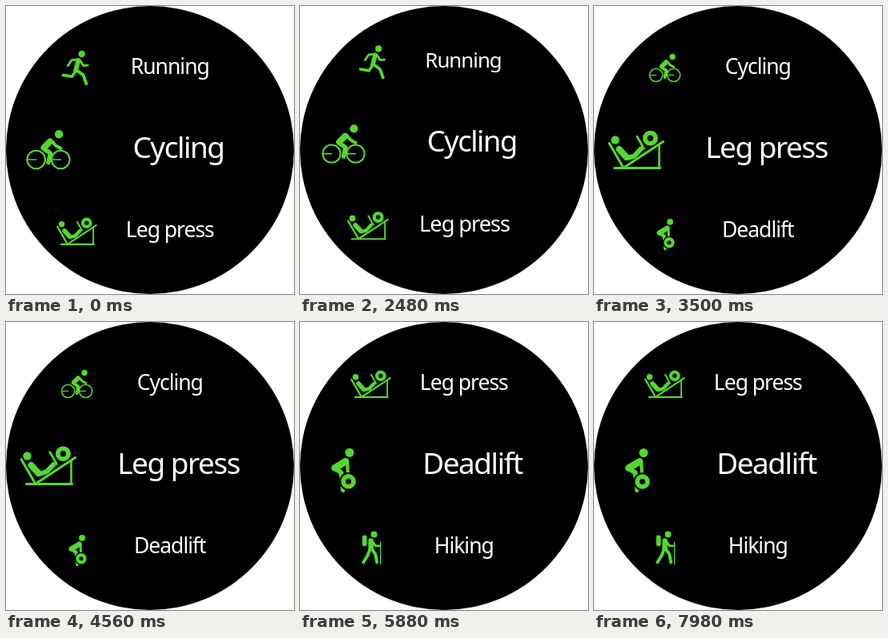
An HTML page with a canvas for the animation above (8 s loop, 360 by 360 pixels).

```html
<!DOCTYPE html>
<html lang="en">
<head>
<meta charset="utf-8">
<title>Workout list</title>
<style>
html, body { margin: 0; width: 100%; height: 100%; overflow: hidden; background: #fff; }
canvas { display: block; width: 360px; height: 360px; }
</style>
</head>
<body>
<canvas id="stage" width="360" height="360"></canvas>
<script>
const ctx = document.getElementById('stage').getContext('2d');
const GREEN = '#54d730';
const LOOP = 8000;
const PITCH = 102;
const MID_Y = 179;
const SCROLL_TIME = 400;
const SCROLLS = [2413, 5313];
const TAU = Math.PI * 2;

const clamp = v => Math.min(1, Math.max(0, v));
const ease = v => (1 - Math.cos(Math.PI * clamp(v))) / 2;
const mix = (a, b, k) => a + (b - a) * k;
const mixPoint = (a, b, k) => [mix(a[0], b[0], k), mix(a[1], b[1], k)];

function line(width, ...points) {
  ctx.lineWidth = width;
  ctx.beginPath();
  points.forEach(([x, y]) => ctx.lineTo(x, y));
  ctx.stroke();
}

function dot(x, y, r, color = GREEN) {
  ctx.fillStyle = color;
  ctx.beginPath();
  ctx.arc(x, y, r, 0, TAU);
  ctx.fill();
}

function ring(x, y, r, width) {
  ctx.lineWidth = width;
  ctx.beginPath();
  ctx.arc(x, y, r, 0, TAU);
  ctx.stroke();
}

function drawRunner() {
  dot(8.5, -23.6, 5.8);
  line(8, [2.5, -12], [-2, 5]);
  line(4, [3, -14.2], [-9, -13], [-15.5, -3.5]);
  line(4, [6, -12], [11, -3.5], [19, -4]);
  line(5, [-2, 6], [-8.5, 15.5], [-24, 13]);
  line(5.5, [0, 4.5], [11, 13], [16.5, 28]);
}

function drawCyclist(t) {
  const riding = t < SCROLLS[0];
  const spin = Math.PI + (riding ? TAU * t / 940 : 0);
  const pedal = Math.PI / 2 + (riding ? TAU * t / 820 : 0);
  const bob = 0.4 * (1 - Math.sin(pedal));

  for (const x of [-15.3, 15.3]) {
    ring(x, 13, 11.3, 2.1);
    line(1.6, [x, 13], [x + Math.cos(spin) * 11, 13 + Math.sin(spin) * 11]);
  }
  const dx = Math.cos(pedal) * 3.5;
  const dy = Math.sin(pedal) * 3.5 - 3.5;
  dot(13.2, -18.8 + bob, 5.2);
  line(8, [2, -9.5 + bob], [-5.5, -2]);
  line(4, [4, -10.5 + bob], [9, -4.5], [15.5, -1]);
  line(5.5, [-5.5, -0.5], [2.5 + dx * 0.5, 5 + dy * 0.6], [0 + dx, 16.5 + dy]);
}

function drawLegPress(t) {
  const start = SCROLLS[0] + SCROLL_TIME;
  const active = t > start && t < SCROLLS[1];
  const push = active ? (1 - Math.cos(TAU * (t - start) / 625)) / 2 : 0;
  const dx = 4 * push;
  const dy = -2.4 * push;

  line(3, [-27.5, 23.5], [29.5, 23.5]);
  line(2.6, [28.5, 23], [28.5, -5]);
  line(3, [-15, 22.5], [33.5, -9.5]);
  line(3, [-34, -7.5], [-17.5, 21]);
  dot(-26.5, -11.5, 5.2);
  line(8, [-21.5, 0], [-12.5, 10]);
  line(6, [-11.5, 11], [-3 + dx * 0.6, 9 + dy], [5 + dx, 0 + dy]);
  line(2.8, [0.5 + dx, -15.5 + dy], [9 + dx, -0.5 + dy]);
  ring(17 + dx, -13.5 + dy, 6.6, 5.8);
}

function drawDeadlift(t) {
  const lift = ease((t - 5780) / 1070) - ease((t - 7050) / 940);
  const shoulder = mixPoint([4, -4.5], [2.5, -15], lift);
  const hip = mixPoint([-9.5, 3.5], [-2.5, 2], lift);
  const knee = mixPoint([-1.5, 9.5], [0.5, 14], lift);
  const plate = mixPoint([7.5, 20.5], [7.5, 10.5], lift);
  const head = mixPoint([9, -15.5], [6.5, -27], lift);

  dot(...head, 5.5);
  line(9, shoulder, hip);
  line(6, hip, knee, [0, 19]);
  line(5, [0, 19], [0.5, 31.5]);
  line(4.2, [shoulder[0] + 2, shoulder[1]], plate);
  dot(...plate, 11.2, '#000');
  ring(...plate, 6.4, 5.8);
}

function drawHiker() {
  dot(5.5, -21.5, 5.6);
  ctx.beginPath();
  ctx.roundRect(-15, -20, 8, 19, 3);
  ctx.fill();
  line(9, [0, -10.5], [0, 3]);
  line(4, [3, -9], [8, -1.5], [15, -1.5]);
  line(1.9, [16.7, -8], [16.7, 30]);
  line(5.5, [-1.5, 4], [-5.5, 15], [-13, 27]);
  line(5.5, [1.5, 4], [8, 13], [10.5, 27]);
}

const items = [
  ['Running', drawRunner],
  ['Cycling', drawCyclist],
  ['Leg press', drawLegPress],
  ['Deadlift', drawDeadlift],
  ['Hiking', drawHiker]
];

function placed(x, y, scale, draw) {
  ctx.save();
  ctx.translate(x, y);
  ctx.scale(scale, scale);
  draw();
  ctx.restore();
}

function drawRow([label, icon], offset, t) {
  const far = Math.abs(offset);
  const y = MID_Y + offset;
  const scale = 1 - 0.00275 * far;
  // Icons follow a gentle curve away from the middle row.
  placed(53 + 0.196 * far + 0.0015 * far * far, y, scale, () => icon(t));
  placed(215.5 - 0.105 * far, y, scale, () => {
    ctx.fillStyle = '#fff';
    ctx.fillText(label, 0, 10.7);
  });
}

function render(t) {
  ctx.fillStyle = '#fff';
  ctx.fillRect(0, 0, 360, 360);
  dot(180, 180, 180, '#000');

  ctx.save();
  ctx.beginPath();
  ctx.arc(180, 180, 180, 0, TAU);
  ctx.clip();
  ctx.strokeStyle = GREEN;
  ctx.lineCap = ctx.lineJoin = 'round';
  ctx.font = '37px "Noto Sans", sans-serif';
  ctx.letterSpacing = '-1.5px';
  ctx.textAlign = 'center';
  const position = SCROLLS.reduce((sum, at) => sum + ease((t - at) / SCROLL_TIME), 1);
  items.forEach((item, i) => {
    const offset = (i - position) * PITCH;
    if (Math.abs(offset) < 210) drawRow(item, offset, t);
  });
  ctx.restore();
}

const began = performance.now();
function tick() {
  render((performance.now() - began) % LOOP);
  requestAnimationFrame(tick);
}
tick();
</script>
</body>
</html>
```
